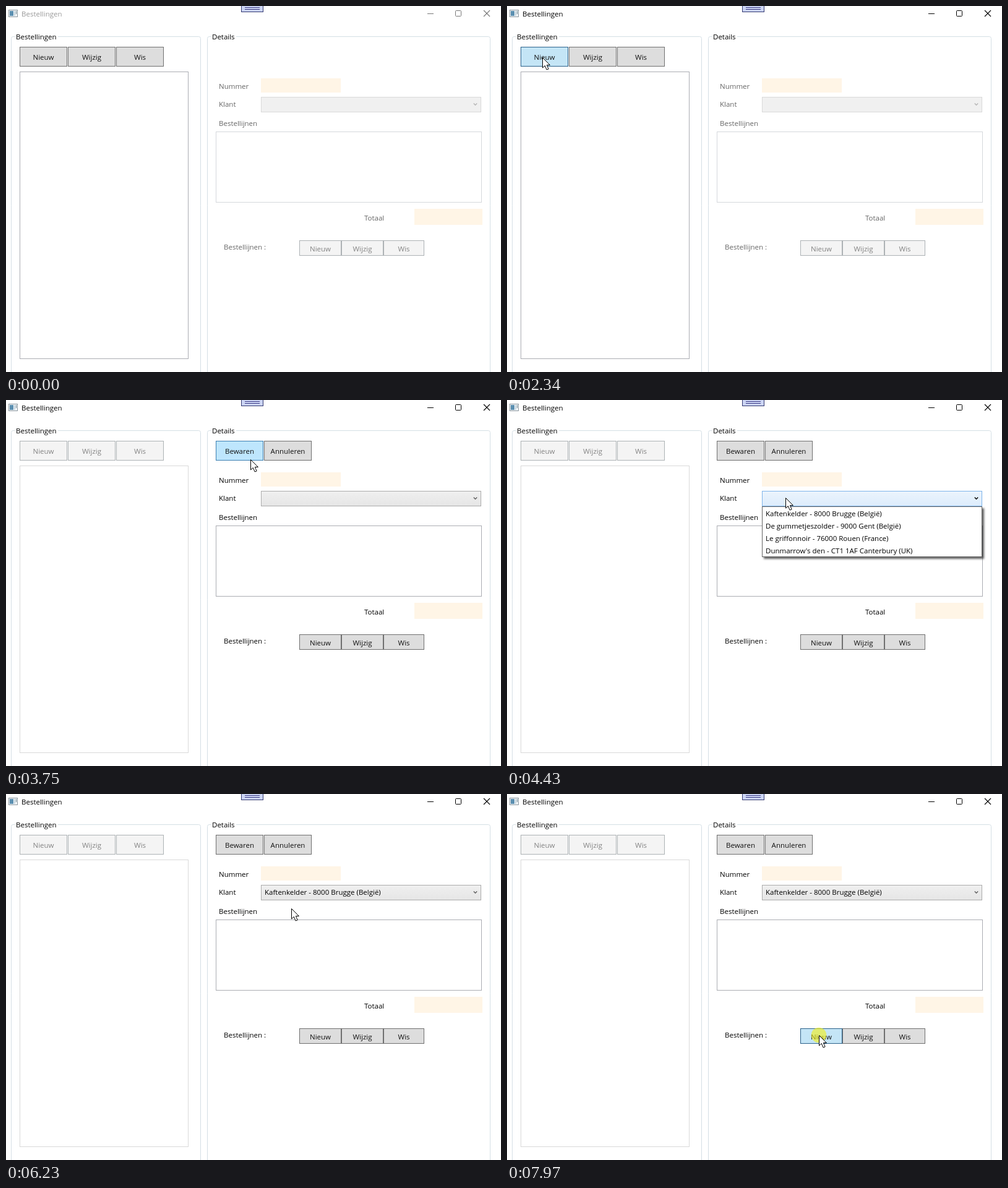
An HTML page with a canvas that plays this animation: 800 by 592 pixels, repeating every 8 s.

```html
<!DOCTYPE html>
<html lang="nl">
<head>
<meta charset="utf-8">
<title>Bestellingen</title>
<style>
  html, body { margin: 0; width: 100%; height: 100%; overflow: hidden; background: #fff; }
  canvas { display: block; width: 800px; height: 592px; }
</style>
</head>
<body>
<canvas id="stage" width="800" height="592"></canvas>
<script>
const ctx = document.getElementById('stage').getContext('2d');
const LOOP = 8000, TICK = 67;
const FONT = '11.5px "Open Sans", "Noto Sans", sans-serif';

const CUSTOMERS = [
  'Kaftenkelder - 8000 Brugge (België)',
  'De gummetjeszolder - 9000 Gent (België)',
  'Le griffonnoir - 76000 Rouen (France)',
  "Dunmarrow's den - CT1 1AF Canterbury (UK)"
];

// Pointer moves: start time, number of ticks, easing, Bézier points
const linear = u => u;
const smooth = u => u * u * (3 - 2 * u);
const MOVES = [
  { at: 790, ticks: 7, ease: linear, x: [888, 430, 235, 120], y: [752, 260, 45, 60] },
  { at: 1266, ticks: 5, ease: linear, x: [120, 90, 55, 55], y: [60, 30, 35, 72] },
  { at: 1600, ticks: 2, ease: linear, x: [55, 55, 56, 57], y: [72, 76, 80, 83] },
  { at: 2890, ticks: 9, ease: smooth, x: [57, 140, 330, 390], y: [83, 112, 116, 88] },
  { at: 3750, ticks: 7, ease: linear, x: [390, 398, 432, 450], y: [88, 104, 150, 158] },
  { at: 4820, ticks: 6, ease: smooth, x: [450, 452, 457, 461], y: [158, 165, 176, 183] },
  { at: 6230, ticks: 8, ease: smooth, x: [461, 460, 448, 446], y: [183, 197, 212, 223] },
  { at: 7140, ticks: 11, ease: smooth, x: [446, 450, 490, 504], y: [223, 290, 330, 390] }
];
const CLICKS = [[2210, 2340], [4360, 4430], [5550, 5750], [7970, 8000]];

const within = (t, a, b) => t >= a && t < b;

function bezier(p, u) {
  const v = 1 - u;
  return v * v * v * p[0] + 3 * v * v * u * p[1] + 3 * v * u * u * p[2] + u * u * u * p[3];
}

function pointer(t) {
  const move = MOVES.filter(m => t >= m.at).pop();
  if (!move) return null;
  const tick = Math.floor((t - move.at) / TICK + 0.02) + 1;
  const u = move.ease(Math.min(1, tick / move.ticks));
  return { x: Math.round(bezier(move.x, u)), y: Math.round(bezier(move.y, u)) };
}

function fill(x, y, w, h, color) {
  ctx.fillStyle = color;
  ctx.fillRect(x, y, w, h);
}

function box(x, y, w, h, bg, border) {
  fill(x, y, w, h, bg);
  ctx.strokeStyle = border;
  ctx.lineWidth = 1;
  ctx.strokeRect(x + 0.5, y + 0.5, w - 1, h - 1);
}

function text(str, x, y, color = '#000', align = 'left') {
  ctx.fillStyle = color;
  ctx.textAlign = align;
  ctx.fillText(str, x, y);
}

function line(color, width, ...pts) {
  ctx.strokeStyle = color;
  ctx.lineWidth = width;
  ctx.beginPath();
  for (let i = 0; i < pts.length; i += 2) ctx.lineTo(pts[i], pts[i + 1]);
  ctx.stroke();
}

const SKINS = {
  normal: ['#dddddd', '#707070', '#111'],
  hover: ['#bee6fd', '#3c7fb1', '#111'],
  pressed: ['#c4e5f6', '#2c628b', '#111'],
  disabled: ['#f4f4f4', '#adb2b5', '#838383']
};

function button(label, x, y, w, h, skin) {
  const [bg, border, color] = SKINS[skin];
  box(x, y, w, h, bg, border);
  text(label, x + w / 2, y + h / 2 + 5, color, 'center');
}

function group(label, x, w, gap) {
  ctx.strokeStyle = '#d5dfe5';
  ctx.lineWidth = 1;
  ctx.beginPath();
  ctx.roundRect(x + 0.5, 49.5, w - 1, 560, 3);
  ctx.stroke();
  fill(x + 6, 48, gap, 3, '#fff');
  text(label, x + 8, 54);
}

function titleBar(active) {
  const ink = active ? '#000' : '#777';
  box(4, 6, 15, 12, '#f4f7f9', '#8c979f');
  fill(6, 8, 6, 8, '#5b8fb0');
  fill(13, 8, 2, 8, '#c3d3dd');
  fill(16, 8, 1, 5, '#6f8794');
  text('Bestellingen', 25, 17, active ? '#000' : '#999');

  box(380, -1, 36, 11, '#ccd5f4', '#343a72');
  fill(386, 2, 24, 1, '#3c3a86');
  fill(386, 5, 24, 1, '#3c3a86');

  line(ink, 1, 681, 12.5, 691, 12.5);
  ctx.beginPath();
  ctx.roundRect(726.5, 7.5, 9, 9, 1);
  ctx.stroke();
  line(ink, 1.1, 772, 7, 782, 17);
  line(ink, 1.1, 782, 7, 772, 17);
}

function combo(edit, hover, value) {
  const shade = ctx.createLinearGradient(0, 147, 0, 172);
  shade.addColorStop(0, !edit ? '#f0f0f0' : hover ? '#ecf4fc' : '#f0f0f0');
  shade.addColorStop(1, !edit ? '#f0f0f0' : hover ? '#dcecfc' : '#e5e5e5');
  box(412, 147, 356, 25, shade, !edit ? '#d9d9d9' : hover ? '#7eb4ea' : '#acacac');
  line(!edit ? '#b5b5b5' : hover ? '#000' : '#606060', 1.4, 755.8, 157.5, 758.5, 160.3, 761.2, 157.5);
  if (value) text(value, 418, 163);
}

function dropDown(itemHover) {
  ctx.save();
  ctx.shadowColor = 'rgba(0,0,0,0.6)';
  ctx.shadowBlur = 3;
  ctx.shadowOffsetX = ctx.shadowOffsetY = 3;
  fill(412, 172, 356, 82, '#fff');
  ctx.restore();
  box(412, 172, 356, 82, '#fff', '#646464');
  if (itemHover) box(413, 173, 354, 21, '#e4f3fa', '#70c0e7');
  CUSTOMERS.forEach((name, i) => text(name, 418, 188 + 20 * i));
}

function clickSpot(p) {
  ctx.fillStyle = 'rgba(245,240,20,0.6)';
  ctx.beginPath();
  ctx.arc(p.x, p.y, 12.3, 0, 7);
  ctx.fill();
}

function arrow(p) {
  ctx.save();
  ctx.translate(p.x + 0.5, p.y + 0.5);
  ctx.beginPath();
  [[0, 0], [0, 16.5], [3.8, 13], [6.6, 19.6], [9.6, 18.4], [6.9, 12], [11.9, 12]]
    .forEach(([x, y]) => ctx.lineTo(x, y));
  ctx.closePath();
  ctx.fillStyle = '#fff';
  ctx.fill();
  ctx.strokeStyle = '#000';
  ctx.lineWidth = 1;
  ctx.stroke();
  ctx.restore();
}

function draw(t) {
  const edit = t >= 2410;
  const label = edit ? '#000' : '#666';
  const leftSkin = edit ? 'disabled' : 'normal';
  const rightSkin = edit ? 'normal' : 'disabled';

  ctx.font = FONT;
  ctx.textBaseline = 'alphabetic';
  fill(0, 0, 800, 592, '#fff');
  titleBar(t >= 2210);

  group('Bestellingen', 8, 307, 70);
  const newSkin = within(t, 1600, 2210) ? 'hover' : within(t, 2210, 2410) ? 'pressed' : leftSkin;
  button('Nieuw', 22, 66, 77, 32, newSkin);
  button('Wijzig', 100, 66, 77, 32, within(t, 1130, 1264) ? 'hover' : leftSkin);
  button('Wis', 178, 66, 77, 32, leftSkin);
  box(22, 106, 273, 465, '#fff', edit ? '#d9d9d9' : '#abadb3');

  group('Details', 325, 458, 41);
  if (edit) {
    button('Bewaren', 339, 66, 77, 32, within(t, 3290, 3820) ? 'hover' : 'normal');
    button('Annuleren', 417, 66, 77, 32, 'normal');
  }
  text('Nummer', 344, 134, label);
  fill(412, 117, 129, 23, '#fff5e6');
  text('Klant', 344, 163, label);
  combo(edit, within(t, 4085, 5020), t >= 5750 && CUSTOMERS[0]);
  text('Bestellijnen', 344, 194, label);
  box(339, 203, 430, 115, '#fff', edit ? '#abadb3' : '#d5d8dc');
  text('Totaal', 579, 347, label);
  fill(660, 328, 110, 26, '#fff5e6');
  text('Bestellijnen :', 352, 394, label);
  const lineSkin = t >= 7970 ? 'pressed' : t >= 7740 ? 'hover' : rightSkin;
  button('Nieuw', 474, 379, 68, 25, lineSkin);
  button('Wijzig', 542, 379, 68, 25, rightSkin);
  button('Wis', 610, 379, 66, 25, rightSkin);

  if (within(t, 4430, 5750)) dropDown(t >= 5020);

  const p = pointer(t);
  if (p) {
    if (CLICKS.some(([a, b]) => within(t, a, b))) clickSpot(p);
    arrow(p);
  }
}

const start = performance.now();
function tick() {
  draw((performance.now() - start) % LOOP);
  requestAnimationFrame(tick);
}
tick();
</script>
</body>
</html>
```
